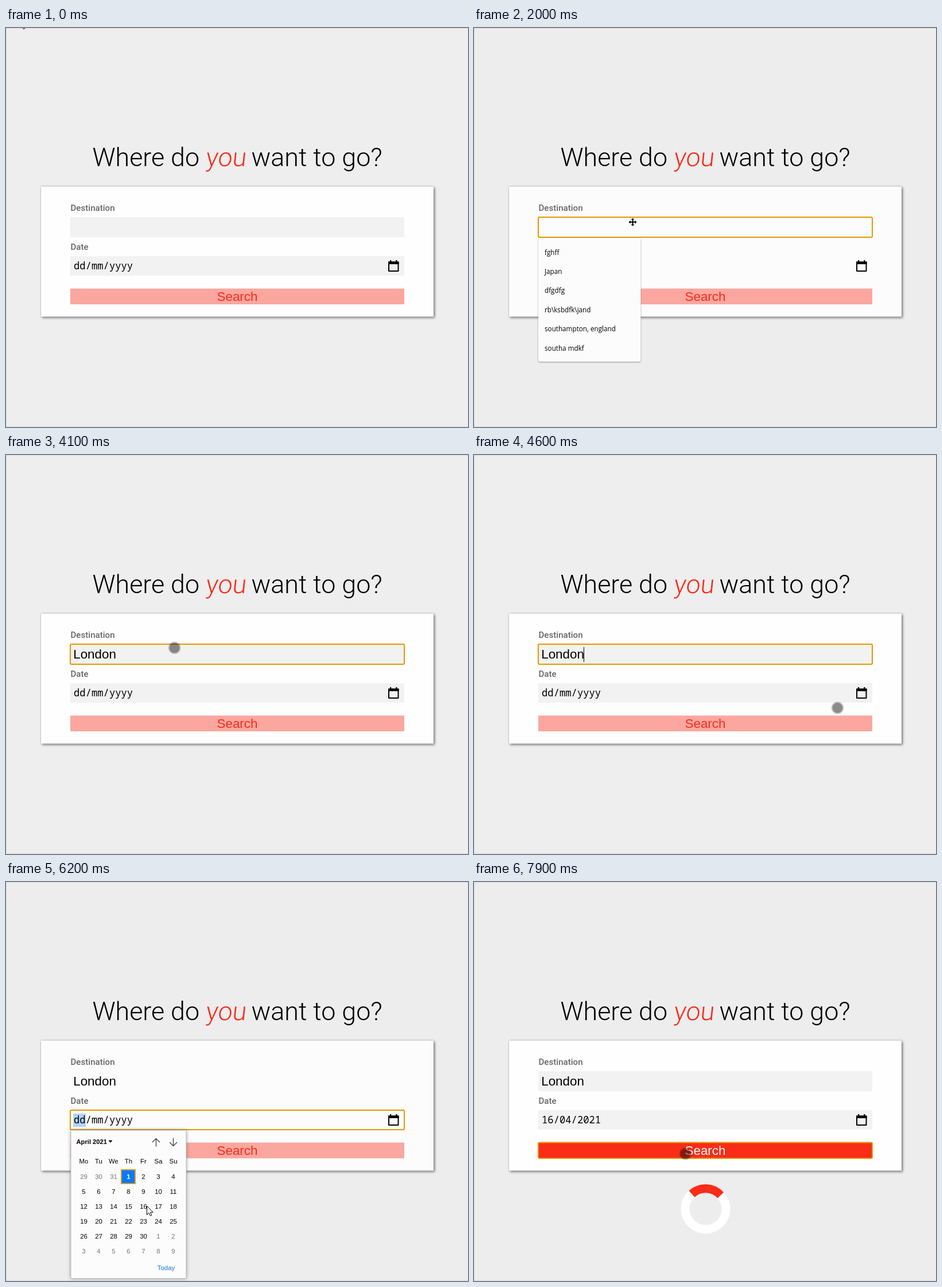
Recreate the animation shown at these times as an HTML page. Size 805x696 px, loop 8000 ms.

```html
<!DOCTYPE html>
<html lang="en">
<head>
<meta charset="utf-8">
<title>Trip search</title>
<style>
html, body { margin: 0; width: 100%; height: 100%; overflow: hidden; background: #eee; }
svg { display: block; width: 805px; height: 696px; }
.title { font: 300 44.8px Roboto, sans-serif; text-anchor: middle; }
.label { font: 500 15.1px Roboto, sans-serif; fill: #666; }
.input { font: 22.4px "Liberation Sans", Arial, sans-serif; }
.date { font: 17.2px "Noto Sans Mono", monospace; }
.option { font: 500 11.7px "Open Sans", sans-serif; }
.cal { font: 11.4px "Liberation Sans", Arial, sans-serif; text-anchor: middle; }
.focus { fill: none; stroke: #e59700; stroke-width: 2; }
.card { filter: drop-shadow(2px 2px 2px rgba(0,0,0,.4)) drop-shadow(0 0 1px rgba(0,0,0,.3)); }
.list { filter: drop-shadow(0 1px 1px rgba(0,0,0,.4)); }
.popup { filter: drop-shadow(0 0 3px rgba(0,0,0,.4)); }
</style>
</head>
<body>
<svg viewBox="0 0 805 696" xmlns="http://www.w3.org/2000/svg">
  <rect id="bg" width="805" height="696"/>
  <path d="M805 .5H.5V695.5H805" fill="none" stroke="#dadada"/>
  <text class="title" x="403" y="241">Where do <tspan visibility="hidden" font-style="italic">you</tspan> want to go?</text>
  <text class="title" transform="translate(382.5 241) skewX(-6)" font-style="italic" fill="#f92b1a">you</text>
  <rect id="card" class="card" x="61" y="276.5" width="684" height="227"/>
  <text class="label" x="112.5" y="319">Destination</text>
  <text class="label" x="112.5" y="386.5">Date</text>
  <rect id="placeField" x="112" y="330" width="582" height="35"/>
  <rect id="dateField" x="112" y="398" width="582" height="34"/>
  <rect id="mark" x="117" y="404" width="22" height="23" fill="#b1d3fb"/>
  <text id="place" class="input" x="117.2" y="355"></text>
  <rect id="caret" y="335" width="1" height="26"/>
  <text id="date" class="date" x="118" y="421"></text>
  <path d="M667 408.5H683.5V424H667Z" fill="none" stroke="#000" stroke-width="2" stroke-linejoin="round"/>
  <path d="M666 407.5H684.5V412H666ZM669 405H671.3V408H669ZM679.2 405H681.5V408H679.2Z"/>
  <rect id="button" x="112" y="454.5" width="582" height="27.5"/>
  <text id="search" class="input" x="403" y="475.5" text-anchor="middle">Search</text>
  <rect id="focus" class="focus" x="112" width="582" rx="2"/>

  <g id="list">
    <rect class="list" x="112" y="367" width="178.5" height="215" rx="3" fill="#fcfcfc"/>
  </g>

  <g id="calendar">
    <rect class="popup" x="113" y="433" width="201" height="258.5" fill="#fcfcfc"/>
    <rect x="113" y="433" width="201" height="258.5" fill="none" stroke="#bdbdbd"/>
    <text class="cal" style="text-anchor:start;font-weight:700;font-size:11.2px" x="122.5" y="457">April 2021</text>
    <path d="M178.5 450.5H185.5L182 455Z"/>
    <path d="M261.5 461.5V447.5M255 454L261.5 447.5L268 454M291.5 446.5V460.5M285 454L291.5 460.5L298 454" fill="none" stroke="#333" stroke-width="1.2"/>
    <rect x="201" y="502" width="24" height="24" fill="#0a78f5" stroke="#cf9a35" stroke-width="2"/>
    <text class="cal" x="279" y="676.5" fill="#1a73d8">Today</text>
  </g>

  <g id="spinner" fill="none" stroke-width="15" transform="translate(403.5 570.3) rotate(2.5)">
    <circle r="35.5" stroke="#fff"/>
    <path d="M-25.1 -25.1A35.5 35.5 0 0 1 25.1 -25.1" stroke="#f92d18"/>
  </g>

  <g id="dot">
    <circle r="9" fill-opacity=".45"/>
    <circle r="9.9" fill="none" stroke="#000" stroke-opacity=".22" stroke-width="1.8"/>
  </g>
  <path id="arrow" d="M.5 .5V15.8L4 12.6L6.4 17.8L8.8 16.8L6.5 11.7H11.2Z" fill="#fff" stroke="#000"/>
  <path id="move" d="M0 -7L3 -4H1V-1H4V-3L7 0L4 3V1H1V4H3L0 7L-3 4H-1V1H-4V3L-7 0L-4 -3V-1H-1V-4H-3Z" stroke="#fff" paint-order="stroke"/>
</svg>
<script>
const LOOP = 8000, STEP = 100, BLINK = 465;
const FOCUS = 1100, LIST = 1200, PICKER = 5300, PICKED = 6800, SENT = 7900;
const $ = id => document.getElementById(id);

function addText(parent, cls, x, y, text, fill = "#000", weight = "") {
  const el = document.createElementNS("http://www.w3.org/2000/svg", "text");
  el.setAttribute("class", cls);
  el.setAttribute("x", x);
  el.setAttribute("y", y);
  el.style.fill = fill;
  el.style.fontWeight = weight;
  el.textContent = text;
  $(parent).appendChild(el);
}

["fghff", "Japan", "dfgdfg", "rb\\ksbdfk\\jand", "southampton, england", "southa mdkf"]
  .forEach((s, i) => addText("list", "option", 123, 395.5 + i * 33.4, s));

const column = i => 135.5 + (i % 7) * 26;
["Mo", "Tu", "We", "Th", "Fr", "Sa", "Su"]
  .forEach((s, i) => addText("calendar", "cal", column(i), 491, s));
for (let i = 0; i < 42; i++) {
  const date = new Date(2021, 2, 29 + i), day = date.getDate(), inside = date.getMonth() === 3;
  const today = inside && day === 1;
  addText("calendar", "cal", column(i), 518 + Math.floor(i / 7) * 26, day,
    today ? "#fff" : inside ? "#000" : "#757575", today ? 700 : "");
}

// Each pointer move eases along a Bezier curve
const moves = [
  { from: 100, to: 800, curve: [[24, -16], [150, 220], [243, 376]] },
  { from: 800, to: 1100, curve: [[243, 376], [276.5, 338.5]] },
  { from: 4000, to: 4900, curve: [[276.5, 338.5], [440, 310], [678, 516], [673, 415]] },
  { from: 5500, to: 6000, curve: [[674, 411], [246, 571]] },
  { from: 6100, to: 6300, curve: [[246, 571], [244, 558]] },
  { from: 7200, to: 7700, curve: [[244, 558], [368.5, 474]] }
];
const typed = [2100, 2400, 3000, 3200, 3400, 3600];

const within = (t, a, b) => t >= a && t < b;
const show = (id, on) => $(id).setAttribute("visibility", on ? "visible" : "hidden");
const set = (id, name, value) => $(id).setAttribute(name, value);
const smooth = u => u * u * (3 - 2 * u);

function bezier(points, u) {
  if (points.length === 1) return points[0];
  const next = points.slice(1).map((p, i) => p.map((v, k) => points[i][k] + (v - points[i][k]) * u));
  return bezier(next, u);
}

function pointer(t) {
  const m = moves.filter(k => t >= k.from).pop() || moves[0];
  const u = Math.min(1, Math.max(0, (t - m.from) / (m.to - m.from)));
  return bezier(m.curve, smooth(u));
}

function draw(time) {
  const t = Math.floor((time % LOOP) / STEP) * STEP;
  const list = within(t, LIST, typed[0]), picker = within(t, PICKER, PICKED);
  const sent = t >= SENT, popup = list || picker;

  set("bg", "fill", popup || sent ? "#ededed" : "#eee");
  set("card", "fill", popup ? "#fcfcfc" : "#fefefe");
  for (const id of ["placeField", "dateField"]) set(id, "fill", popup ? "#fcfcfc" : "#f2f2f2");
  show("list", list);
  show("calendar", picker);

  const n = typed.filter(k => t >= k).length;
  const woke = n ? typed[n - 1] : LIST + STEP;
  $("place").textContent = "London".slice(0, n);
  set("caret", "x", Math.floor(117.2 + n * 12.45));
  show("caret", within(t, LIST, PICKER) && Math.floor((t - woke) / BLINK) % 2 <= 0);
  $("date").textContent = t < PICKED ? "dd/mm/yyyy" : "16/04/2021";
  show("mark", within(t, PICKER, SENT));

  const field = t < PICKER ? "placeField" : sent ? "button" : "dateField";
  show("focus", t >= FOCUS);
  for (const a of ["y", "height"]) set("focus", a, $(field).getAttribute(a));
  set("button", "fill", sent ? "#f92d18" : "#fba79f");
  set("search", "fill", sent ? "#fff" : "#f92b1a");
  show("spinner", sent);

  const arrow = t < 200 || within(t, PICKER, PICKED + STEP);
  const kind = within(t, 1400, 2200) ? "move" : arrow ? "arrow" : "dot";
  const [x, y] = pointer(within(t, PICKER, 5500) ? 5500 : t);
  for (const id of ["dot", "arrow", "move"]) {
    show(id, id === kind);
    set(id, "transform", `translate(${x} ${y})`);
  }
}

let start;
function tick(now) {
  start ??= now;
  draw(now - start);
  requestAnimationFrame(tick);
}
draw(0);
requestAnimationFrame(tick);
</script>
</body>
</html>
```
